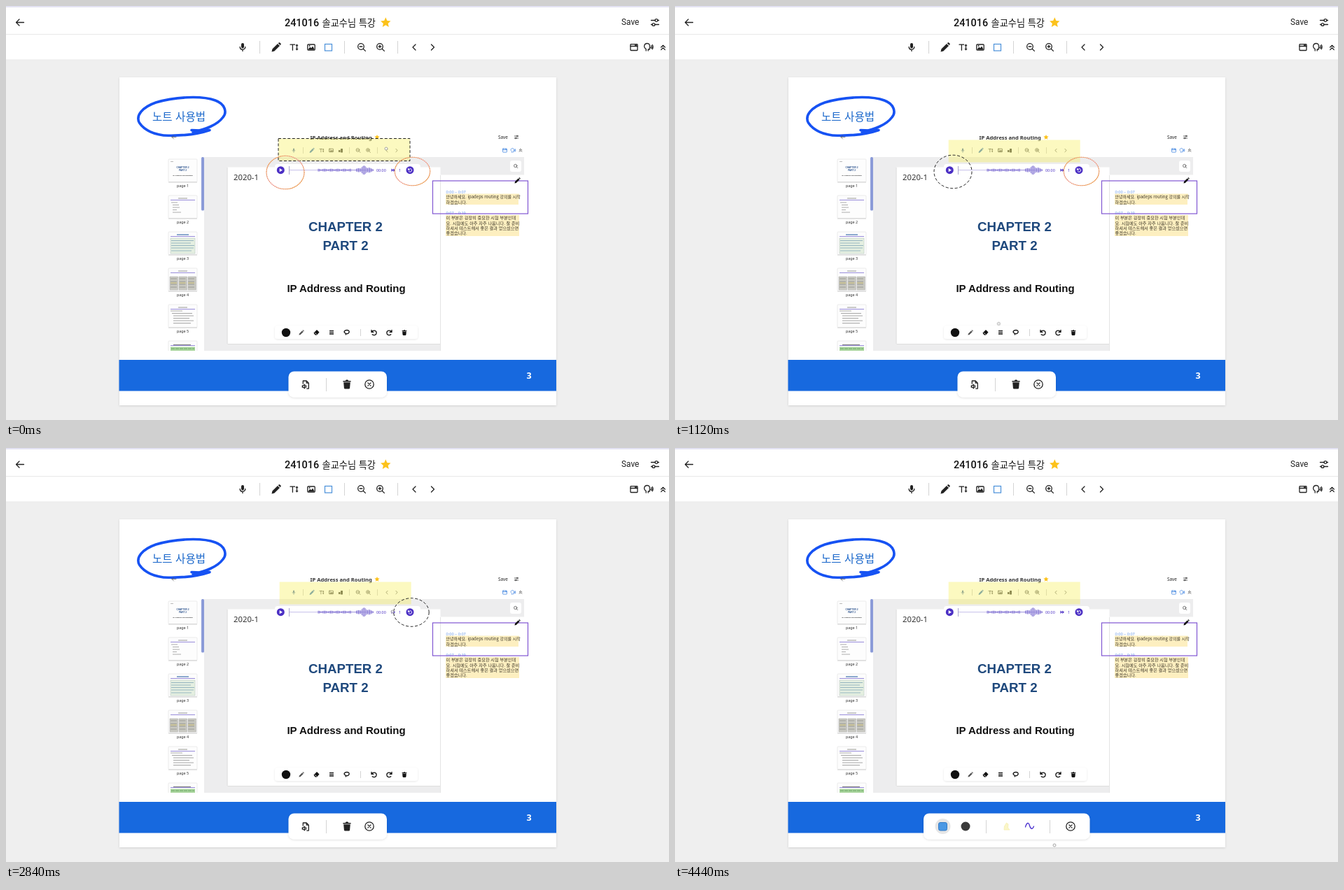
An HTML page that plays this animation: 947x592 px, repeating every 4.48 s.

```html
<!DOCTYPE html>
<html lang="ko">
<head>
<meta charset="utf-8">
<title>Note editor</title>
<style>
html, body { margin: 0; width: 100%; height: 100%; overflow: hidden; background: #efefef; }
svg { display: block; width: 100vw; height: 100vh; }
text { font-family: "Noto Sans CJK KR", "Noto Sans CJK", "Noto Sans", sans-serif; }
.roboto { font-family: Roboto, sans-serif; }
.arial { font-family: "Liberation Sans", Arial, sans-serif; font-weight: 700; text-anchor: middle; }
.noto { font-family: "Noto Sans", sans-serif; }
.mid { text-anchor: middle; }
.i { fill: none; stroke: currentColor; stroke-width: 1.3; stroke-linecap: round; stroke-linejoin: round; }
.f { fill: currentColor; stroke: none; }
.sep { stroke: #d4d4d4; fill: none; }
.dash { fill: none; stroke: #222; stroke-width: 1; stroke-dasharray: 4 2.6; }
.ring { fill: none; stroke: url(#warm); stroke-width: 1.1; }
.ring + .ring { stroke: #ef9a3a; stroke-dasharray: 1 1.6; }

.a { animation: 4.48s step-end infinite; }
.box-pick { animation-name: boxPick; }
.box-move { animation-name: boxMove; }
.left-idle { animation-name: boxPick; }
.left-pick { animation-name: leftPick; }
.left-move { animation-name: leftMove; }
.right-idle { animation-name: rightIdle; }
.right-pick { animation-name: rightPick; }
.dock-item { animation-name: dockItem; }
.dock-pen { animation-name: dockPen; }
.cursor { animation: cursor 4.48s ease-in-out infinite; }

@keyframes boxPick { 0% { opacity: 1 } 13.4%, 100% { opacity: 0 } }
@keyframes boxMove {
  0% { transform: none } 13.4% { transform: translate(.5px, .5px) }
  16%, 100% { transform: translate(1.7px, 2px) }
}
@keyframes leftPick { 0% { opacity: 0 } 13.4% { opacity: 1 } 39.3%, 100% { opacity: 0 } }
@keyframes leftMove { 0% { transform: none } 16%, 100% { transform: translate(-1px, -1px) } }
@keyframes rightIdle { 0% { opacity: 1 } 61.6%, 100% { opacity: 0 } }
@keyframes rightPick { 0% { opacity: 0 } 61.6% { opacity: 1 } 84%, 100% { opacity: 0 } }
@keyframes dockItem { 0% { opacity: 1 } 39.3% { opacity: 0 } 61.6% { opacity: 1 } 84%, 100% { opacity: 0 } }
@keyframes dockPen { 0% { opacity: 0 } 39.3% { opacity: 1 } 61.6% { opacity: 0 } 84%, 100% { opacity: 1 } }
@keyframes cursor {
  0%, 2% { transform: translate(543px, 204px) }
  12% { transform: translate(401px, 246px) }
  15.2% { transform: translate(402px, 250px) }
  31%, 46% { transform: translate(488px, 541px) }
  50% { transform: translate(496px, 545px) }
  60%, 64.5% { transform: translate(552px, 234px) }
  76% { transform: translate(490px, 541px) }
  77.7%, 88% { transform: translate(491px, 541px) }
  99.1%, 100% { transform: translate(542px, 568px) }
}
</style>
</head>
<body>
<svg viewBox="0 0 947 592" preserveAspectRatio="none">
<defs>
  <linearGradient id="warm" x1="0" y1="0" x2="1" y2="1">
    <stop offset="0" stop-color="#e9a25c"/><stop offset=".5" stop-color="#efb0dc"/><stop offset="1" stop-color="#e9a04a"/>
  </linearGradient>
  <filter id="soft" x="-10%" y="-20%" width="120%" height="150%">
    <feDropShadow dx="0" dy="1" stdDeviation="1.6" flood-opacity=".13"/>
  </filter>
  <clipPath id="side"><path d="M204 214H283V493H204Z"/></clipPath>

  <!-- Icons are centred on the origin -->
  <path id="back" class="i" d="M5.5 0H-5.5M-1-4.5-5.5 0-1 4.5"/>
  <g id="sliders" class="i"><path d="M-5.5-3H0M4-3H5.5M-5.5 3H-4M0 3H5.5"/><circle cx="2" cy="-3" r="1.9"/><circle cx="-2" cy="3" r="1.9"/></g>
  <path id="star" fill="#fcc21b" d="M0-7.2 2.1-2.4 7.2-2 3.4 1.4 4.5 6.4 0 3.8-4.5 6.4-3.4 1.4-7.2-2-2.1-2.4Z"/>
  <g id="mic" class="i"><rect class="f" x="-2" y="-6" width="4" height="7.4" rx="2"/><path d="M-3.8-.6C-3.8 4.6 3.8 4.6 3.8-.6M0 3.4V5.6"/></g>
  <g id="pencil"><path class="f" d="M-6.5 6.5-5.6 2.6 2-5 5 -2-2.6 5.6ZM2.8-5.8 4.2-7Q5-7 6.7-5.2 7-4.4 5.8-2.8Z"/></g>
  <g id="type"><path class="i" stroke-width="1.8" d="M-5.5-3.8H1.2M-2.1-3.8V4.2"/><path class="i" d="M4-3V3"/><path class="f" d="M4-4.8 6-2H2ZM4 4.8 2 2H6Z"/></g>
  <g id="image" class="i"><rect x="-5.2" y="-4" width="10.4" height="8" rx="1"/><path class="f" d="M-4.5 3.2-1.8-.4 0 1.2 2.2-1.6 4.6 3.2Z"/><circle class="f" cx="-2.4" cy="-2" r=".9"/></g>
  <g id="lens" class="i"><circle cx="-1" cy="-1" r="4.3"/><path d="M2.2 2.2 5.4 5.4"/></g>
  <g id="out"><use href="#lens"/><path class="i" d="M-2.8-1H.8"/></g>
  <g id="in"><use href="#out"/><path class="i" d="M-1-2.8V.8"/></g>
  <path id="prev" class="i" d="M2-4-2 0 2 4"/>
  <path id="next" class="i" d="M-2-4 2 0-2 4"/>
  <g id="window" class="i"><rect x="-5" y="-4.3" width="10" height="8.8" rx=".8"/><path d="M-5-1.5H5M1.5-3H3.6"/></g>
  <path id="voice" class="i" d="M-2.8 5V2.6C-7.5-1-4.8-5.5-1.2-5.5 2.2-5.5 2.4-3 2.3-1.6L3.3.6H2.3V3H.2V5M4.7-2.5Q5.8-.5 4.7 1.7M6.3-3.5Q8-.5 6.3 2.7"/>
  <path id="up" class="i" d="M-2.8 0 0-2.8 2.8 0M-2.8 3.6 0 .8 2.8 3.6"/>
  <g id="trash"><path class="f" d="M-5.6-5H-2.2L-1.4-6.4H1.4L2.2-5H5.6V-3.5H-5.6ZM-4.8-2.7H4.8L4.1 5.2Q4 6.5 2.7 6.5H-2.7Q-4 6.5-4.1 5.2Z"/></g>
  <g id="close" class="i"><circle r="6.2"/><path d="M-2.1-2.1 2.1 2.1M2.1-2.1-2.1 2.1"/></g>
  <g id="audio" class="i" stroke-width="1"><path d="M-3.7-1.5V-5.5H1.2L4.3-2.4V5.6H1.8M1.2-5.5V-2.4H4.3"/><path d="M-4.7 1.3H-3.2L-1.4-.3V5.3L-3.2 3.7H-4.7ZM.2 1Q1.2 2.5.2 4"/></g>
  <path id="undo" class="i" d="M-3.5-3.5V-.6H-.6M-3.3-.8C-1.5-4 3.6-3.4 3.6.4 3.6 3.4 0 4.4-2.3 2.8"/>
  <path id="wave" class="i" stroke-width="1.4" d="M-6 1C-4-6-1.4-6 0-1S4 5 6 0"/>
  <g id="sheet"><rect x="232" y="219" width="41" height="32.5" rx="1" fill="#fdfdfd" stroke="#e3e3e3" stroke-width=".7"/><path d="M232 252H273" stroke="#cfcfcf"/></g>
  <path id="rule" d="M235 225.5H270" stroke="#8d7fd6" stroke-width=".9"/>
</defs>

<!-- App frame -->
<rect width="947" height="592" fill="#efefef"/>
<rect width="947" height="77" fill="#fff"/>
<rect width="947" height="2" fill="#e4e3f3"/>
<path d="M0 40.5H947M0 77H947" stroke="#e9e9e9"/>
<g color="#222">
  <use href="#back" x="20" y="23.5"/>
  <text class="roboto" x="398" y="28.5" font-size="14.4" font-weight="500" fill="#111">241016</text>
  <text x="451.5" y="28.5" font-size="13.2" font-weight="500" fill="#111">솔교수님 특강</text>
  <use href="#star" x="542.3" y="23.5"/>
  <text class="roboto" x="879" y="27" font-size="11.9" fill="#222">Save</text>
  <use href="#sliders" x="927" y="23.5"/>
  <use href="#mic" x="338" y="59"/>
  <use href="#pencil" x="386" y="59"/>
  <use href="#type" x="411.5" y="59"/>
  <use href="#image" x="436" y="59"/>
  <rect x="455.5" y="54.5" width="10" height="9.5" fill="#fff" stroke="#4a90d9" stroke-width="1.2"/>
  <use href="#out" x="508" y="59"/>
  <use href="#in" x="535" y="59"/>
  <use href="#prev" x="583" y="59"/>
  <use href="#next" x="609.5" y="59"/>
  <use href="#window" x="897" y="59"/>
  <use href="#voice" x="917" y="59"/>
  <use href="#up" x="938.5" y="59"/>
</g>
<path class="sep" d="M362.5 50V68M483.5 50V68M559.5 50V68"/>

<!-- Slide -->
<rect x="162" y="102" width="624" height="469" fill="#fff" filter="url(#soft)"/>
<rect x="161.5" y="506" width="624.5" height="44.5" fill="#1769df"/>
<text class="noto mid" x="747" y="532.5" font-size="12.5" font-weight="600" fill="#fff">3</text>
<text x="209" y="163.5" font-size="15.6" font-weight="500" fill="#1b68cb">노트 사용법</text>
<path d="M265 177.500Q278 178.500 291 177.500C275 183 252 185.500 232 185.200 212 185 197 177 190.500 167 185 157 194 145 214 138 240 130 279 127.500 299 135 313 140 316 152 310 159 302 170 284 177 267 180" fill="none" stroke="#1652f3" stroke-width="3.6" stroke-linecap="round" stroke-linejoin="round"/>

<!-- Picture of the editor inside the slide -->
<path d="M283 216H740V241.500H620.500V493H283Z" fill="#ededee"/>
<rect x="316.500" y="230.500" width="304" height="252.500" fill="#fff"/>
<path d="M316.500 483.500H620M316 231V483" stroke="#dedede" fill="none"/>
<path d="M620.500 242V493" stroke="#e4e4e4"/>
<use href="#back" transform="translate(240 187.500) scale(.55)" color="#555"/>
<text class="noto mid" x="478.700" y="190.700" font-size="7.600" font-weight="600" fill="#333">IP Address and Routing</text>
<use href="#star" transform="translate(530 187.500) scale(.5)"/>
<text class="noto" x="703" y="190" font-size="6.400" fill="#222">Save</text>
<use href="#sliders" transform="translate(729 187.500) scale(.5)" color="#222"/>
<g color="#555">
  <use href="#mic" transform="translate(411 206.500) scale(.5)" color="#5d7fae"/>
  <use href="#pencil" transform="translate(437 206.500) scale(.53)" color="#4f86c4"/>
  <use href="#type" transform="translate(451 206.500) scale(.55)"/>
  <use href="#image" transform="translate(464.500 206.500) scale(.58)"/>
  <path class="f" d="M475 206H477.500V209H475ZM478 204H481V209.500H478Z"/>
  <use href="#out" transform="translate(503 206.500) scale(.55)"/>
  <use href="#in" transform="translate(517.500 206.500) scale(.55)"/>
  <use href="#prev" transform="translate(544 206.500) scale(.55)"/>
  <use href="#next" transform="translate(558 206.500) scale(.55)"/>
  <path class="sep" d="M424.500 202V211M490.500 202V211M530.500 202V211"/>
  <use href="#window" transform="translate(712.500 206.500) scale(.58)" color="#3d82e0"/>
  <use href="#voice" transform="translate(724 206.500) scale(.55)" color="#3d82e0"/>
  <use href="#up" transform="translate(735 206) scale(.6)" color="#222"/>
</g>

<!-- Page list -->
<g clip-path="url(#side)">
  <g id="sheets"></g>
  <g class="arial" fill="#28508c"><text class="arial" x="252.500" y="231.500" font-size="3.200">CHAPTER 2</text><text class="arial" x="252.500" y="236" font-size="3.200">PART 2</text><text class="arial" x="252.500" y="242.500" font-size="2.500" fill="#222">IP Address and Routing</text></g>
  <path d="M235 222.500H239" stroke="#aaa" stroke-width=".8"/>
  <use href="#rule" y="52"/><use href="#rule" y="104"/><use href="#rule" y="156"/><use href="#rule" y="208"/><use href="#rule" y="260"/>
  <path d="M246 275H259M246 379H259M246 431H259" stroke="#777" stroke-width=".8"/>
  <path d="M236 281H245M238 284.500H247M238 288H248M238 291.500H244M238 295H250" stroke="#999" stroke-width=".8"/>
  <path d="M244 327H261" stroke="#4474b0" stroke-width="1.200"/>
  <rect x="235" y="332" width="35" height="22" fill="#e5efe1" stroke="#b9c8c1" stroke-width=".6"/>
  <path d="M236 335.500H268M236 339H264M236 342.500H269M236 346H268M236 350H265" stroke="#8daebb" stroke-width=".9"/>
  <path d="M234 387H245.500V406H234ZM247 387H258.500V406H247ZM260 387H271.500V406H260Z" fill="#c9c9c2" stroke="#aaa" stroke-width=".5"/>
  <path d="M235 390H271M235 394H271M235 398H271M235 402H271" stroke="#8f8f88" stroke-width=".8" stroke-dasharray="9 3.500"/>
  <path d="M235 396H271" stroke="#c6b96d" stroke-width="1" stroke-dasharray="9 3.500"/>
  <path d="M235 436H252M237 439.500H266M239 443H268M239 446.500H262M239 450H268M239 453.500H264" stroke="#909090" stroke-width=".8"/>
  <path d="M239 484.500H264" stroke="#777" stroke-width="1"/>
  <path d="M235 487.500H270V493H235Z" fill="#a9d59d"/><path d="M236 490H269" stroke="#6ba565" stroke-dasharray="5 1"/>
</g>
<rect x="279" y="216" width="4" height="76.500" rx="1.500" fill="#8b9bd8"/>

<!-- Audio bar -->
<rect x="384" y="226" width="208" height="17.500" rx="4" fill="#fff"/>
<g color="#4b2fc4">
  <circle class="f" cx="392.300" cy="234.700" r="5.500"/><path d="M390.700 232.100V237.300L395 234.700Z" fill="#fff"/>
  <path d="M404.500 229V241" stroke="#aaa3cf"/>
  <path d="M405 234.700H525" stroke="#b5abe5" stroke-width=".8"/>
  <path id="bars" fill="none" stroke="#7362cf" stroke-width=".9"/>
  <text class="noto" x="529" y="237" font-size="5.400" fill="#4b2fc4">00:00</text>
  <path class="f" d="M550.500 232.400 553.200 234.700 550.500 237ZM553.200 232.400 556 234.700 553.200 237Z"/>
  <text class="noto" x="561" y="237" font-size="5.500" fill="#4b2fc4">1</text>
  <circle class="f" cx="577" cy="234.700" r="5.500"/>
  <use href="#undo" transform="translate(577 234.700) scale(.72)" color="#fff"/>
</g>

<text class="noto" x="325" y="248.500" font-size="11.300" fill="#333">2020-1</text>
<text class="arial" x="485" y="322" font-size="18.700" fill="#1f497d">CHAPTER 2</text>
<text class="arial" x="485" y="349" font-size="18.700" fill="#1f497d">PART 2</text>
<text class="arial" x="486" y="409" font-size="15" fill="#111">IP Address and Routing</text>

<rect x="384" y="457" width="204" height="19" rx="4" fill="#fff" filter="url(#soft)" opacity=".75"/>
<g color="#111">
  <circle class="f" cx="400" cy="467" r="6.200"/>
  <use href="#pencil" transform="translate(422 467) scale(.55)" color="#555"/>
  <path class="f" d="M439.500 467.500 444 463 447.500 466.500 444 470.500H441.500Z"/><path d="M441.500 467.500 443.500 469.500" stroke="#fff"/>
  <path d="M462 464.500H468M462 466.800H468M462 469H468" stroke="#222" stroke-width="1.300"/>
  <path class="i" stroke-width="1" d="M485 468C481 466 484 463.500 487 463.500S491.500 466 489 468 484.500 467 485.500 470"/>
  <path class="sep" d="M506.500 462V472"/>
  <use href="#undo" x="525.500" y="467"/>
  <use href="#undo" transform="translate(547.500 467) scale(-1 1)"/>
  <use href="#trash" transform="translate(569 467) scale(.6)"/>
</g>

<!-- Script notes -->
<rect x="720" y="221" width="16" height="16" rx="3" fill="#fff"/>
<use href="#lens" transform="translate(728.200 229) scale(.5)" color="#333"/>
<path d="M628 268.500H733V276.500H732V284H628ZM628 299H733V329H628Z" fill="#fdefc0"/>
<g font-size="5.600" fill="#6c9be8"><text class="noto" x="628.500" y="267.500">0:00 ~ 0:07</text><text class="noto" x="628.500" y="297.500">0:07 ~ 0:19</text></g>
<g font-size="6.200" fill="#3a3527">
  <text x="628.500" y="275" font-size="6">안녕하세요. ipadeps routing 강의를 시작</text>
  <text x="628.500" y="282.500">하겠습니다.</text>
  <text x="628.500" y="305">이 부분은 굉장히 중요한 시험 부분인데</text>
  <text x="628.500" y="312.500">요. 시험에도 아주 자주 나옵니다. 잘 준비</text>
  <text x="628.500" y="319.800">하셔서 테스트해서 좋은 결과 얻으셨으면</text>
  <text x="628.500" y="327.200">좋겠습니다.</text>
</g>
<rect x="609.500" y="250" width="136" height="47" fill="none" stroke="#8056d2" stroke-width="1.200"/>
<use href="#pencil" transform="translate(730.500 249.500) scale(.62)" color="#111"/>

<!-- Drawn shapes -->
<g class="a box-move">
  <rect x="389" y="189.500" width="188" height="32" fill="#f6ef55" fill-opacity=".37"/>
  <rect class="dash a box-pick" x="389" y="189.500" width="188" height="32"/>
</g>
<g class="a left-idle"><ellipse class="ring" cx="399" cy="238" rx="27" ry="23.800"/><ellipse class="ring" cx="399" cy="238" rx="27" ry="23.800"/></g>
<g class="a left-pick"><ellipse class="dash a left-move" cx="398" cy="238" rx="27" ry="23.800"/></g>
<g class="a right-idle"><ellipse class="ring" cx="580.500" cy="236.500" rx="25.200" ry="20.300"/><ellipse class="ring" cx="580.500" cy="236.500" rx="25.200" ry="20.300"/></g>
<ellipse class="dash a right-pick" cx="579" cy="235" rx="25.200" ry="20.300"/>

<!-- Bottom docks -->
<g class="a dock-item" color="#222">
  <rect x="403.500" y="522.500" width="140.500" height="37" rx="8" fill="#fff" filter="url(#soft)"/>
  <use href="#audio" x="428" y="541.500"/>
  <path class="sep" d="M457.500 532V551"/>
  <use href="#trash" x="487" y="541"/>
  <use href="#close" x="519" y="541"/>
</g>
<g class="a dock-pen" color="#222">
  <rect x="355" y="522.500" width="237.500" height="37" rx="8" fill="#fff" filter="url(#soft)"/>
  <circle cx="382.500" cy="541" r="11" fill="#e6e6e6"/>
  <rect x="376.500" y="535.500" width="12" height="11.500" rx="2.500" fill="#4a98e4" stroke="#347cc6"/>
  <circle cx="415" cy="541" r="6.500" fill="#3b3b3b"/>
  <path class="sep" d="M444.500 532V551M535.500 532V551"/>
  <path d="M470 546 470.500 541 473.500 536 476 538 475.500 543 478 546Z" fill="#fbf6c8" stroke="#f5efb0" stroke-width=".8"/>
  <use href="#wave" x="506.500" y="541" color="#4b32cf"/>
  <use href="#close" x="565" y="541"/>
</g>

<circle class="cursor" r="2" fill="#fff" fill-opacity=".75" stroke="#999" stroke-width=".9"/>
</svg>
<script>
const sheets = document.getElementById('sheets');
let rows = '';
for (let n = 0; n < 6; n++) {
  const y = n * 52;
  rows += `<use href="#sheet" y="${y}"/><text class="noto mid" x="252.500" y="${y + 259}" font-size="5.400" fill="#333">page ${n + 1}</text>`;
}
sheets.innerHTML = rows;

// Speech waveform: quiet first, louder near the end
let bars = '';
for (let x = 446; x < 525; x += 1.6) {
  const gap = x > 494 && x < 500;
  const loud = x > 500 ? 5 * Math.exp(-(((x - 512) / 8) ** 2)) + 1.5 : 2;
  const h = gap ? 0.4 : loud * (0.45 + 0.55 * Math.abs(Math.sin(x * 2.3)));
  bars += `M${x} ${234.7 - h}V${234.7 + h}`;
}
document.getElementById('bars').setAttribute('d', bars);
</script>
</body>
</html>
```
